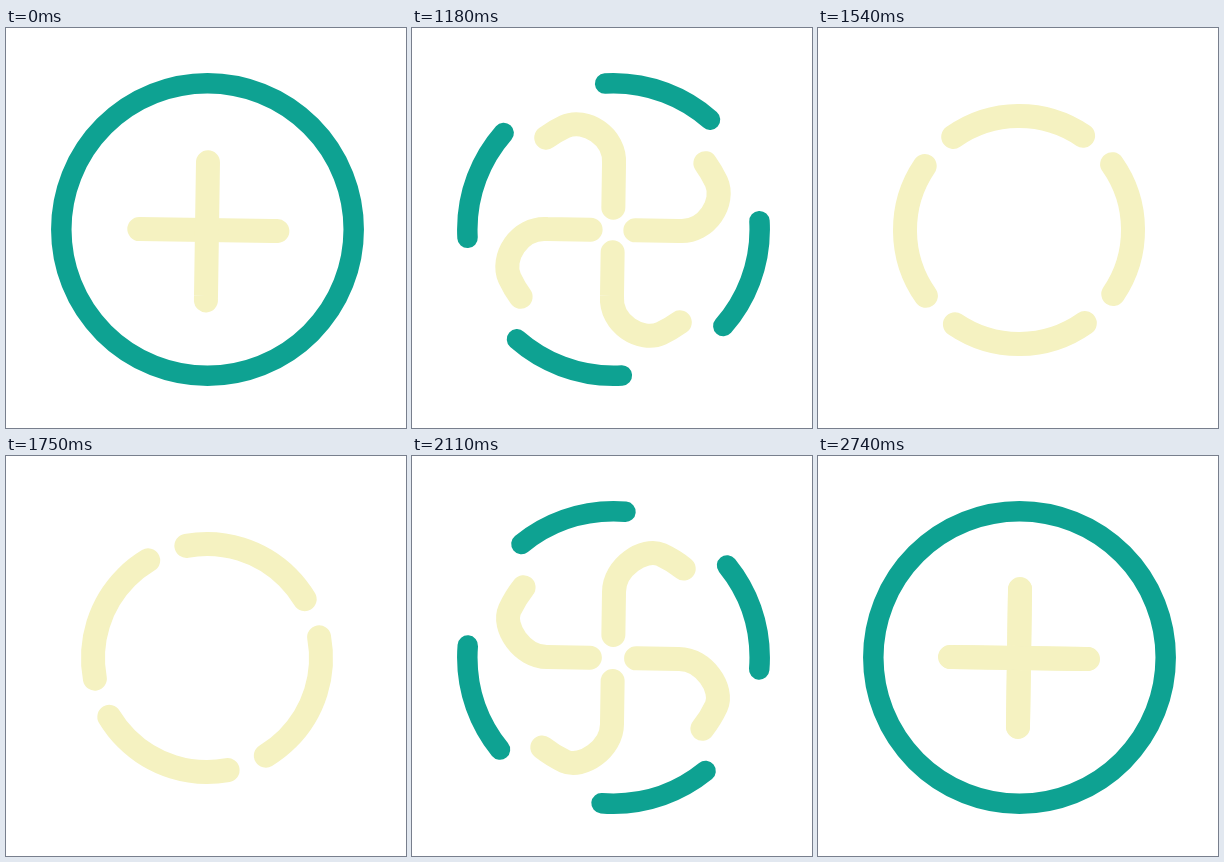
Animation, 400 px wide and 400 px high, one loop 2.89 s. Source, as an HTML page:

```html
<!DOCTYPE html>
<html lang="en">
<head>
<meta charset="utf-8">
<title>Plus loop</title>
<style>
  html, body { margin: 0; width: 100%; height: 100%; overflow: hidden; background: #fff; }
  svg { display: block; width: 100%; height: 100%; }
  svg * { fill: none; stroke-linecap: round; stroke-linejoin: round; }
  #ring { stroke: #0ea292; stroke-width: 20.5; }
  .arm { stroke: #f5f2c1; stroke-width: 24; }
</style>
</head>
<body>
<svg viewBox="0 0 400 400">
  <circle id="ring" cx="201.5" cy="201.5" r="146.2" pathLength="360"/>
  <g id="arms" transform="translate(201 202)"></g>
</svg>
<script>
const LOOP = 2890, START = 1030, STEP = 30, LAST = 57;
const LENGTH = 138;

// In along one bar, out onto the circle, 220 degrees around it, back in along the other bar
const ROUTE = `M-69 -1 L66 1 C94 3 112.6 -28 103.3 -48.2
  A114 114 0 1 0 -48.2 103.3 C-31 111 -1 91 -1 66 L1 -69`;

const ring = document.getElementById('ring');
const group = document.getElementById('arms');

// Right, down, left, up
const arms = [0, 90, 180, 270].map(angle => {
  const path = document.createElementNS('http://www.w3.org/2000/svg', 'path');
  path.setAttribute('class', 'arm');
  path.setAttribute('d', ROUTE);
  path.setAttribute('transform', `rotate(${angle})`);
  path.setAttribute('stroke-dasharray', `${LENGTH} 3000`);
  group.append(path);
  return path;
});
const travel = arms[0].getTotalLength() - LENGTH;

const remaining = n => 42 * Math.pow((LAST - n) / 16, 2.915);

// Step, distance, speed per step
const keys = [
  [0, 17, 15],
  [10, 165, 14.7],
  [17, 269, 16.5],
  [31, travel - remaining(31), 19.4]
];

function hermite([n0, s0, v0], [n1, s1, v1], n) {
  const d = n1 - n0, t = (n - n0) / d, r = 1 - t;
  return r * r * ((1 + 2 * t) * s0 + t * d * v0) +
         t * t * ((3 - 2 * t) * s1 - r * d * v1);
}

function distance(n) {
  if (n < 0) return 1.3;
  if (n >= 31) return travel - remaining(n);
  const i = keys.findIndex(k => n < k[0]);
  return hermite(keys[i - 1], keys[i], n);
}

function drawRing(n, s) {
  const closing = n > 20;
  const size = closing ? 91.8 - (travel - s) * 0.518 : 84.1 - (s - 17) * 0.531;
  const sweep = n < 0 ? 90 : Math.min(90, size);
  const from = closing ? 4.7 - sweep : -3.3;
  ring.style.visibility = sweep > 0 ? 'visible' : 'hidden';
  ring.setAttribute('stroke-dasharray', sweep < 90 ? `${Math.max(0, sweep)} ${90 - sweep}` : 'none');
  ring.setAttribute('stroke-dashoffset', -from);
}

function draw(time) {
  const t = time % LOOP;
  const n = Math.max(-1, Math.min(LAST, Math.floor((t - START) / STEP)));
  const s = distance(n);
  drawRing(n, s);
  arms.forEach((arm, i) => {
    arm.setAttribute('stroke-dashoffset', -s);
    // The left and up strokes join one step late
    arm.style.visibility = i < 2 || n > 0 ? 'visible' : 'hidden';
  });
}

function tick() {
  draw(performance.now());
  requestAnimationFrame(tick);
}
tick();
</script>
</body>
</html>
```
